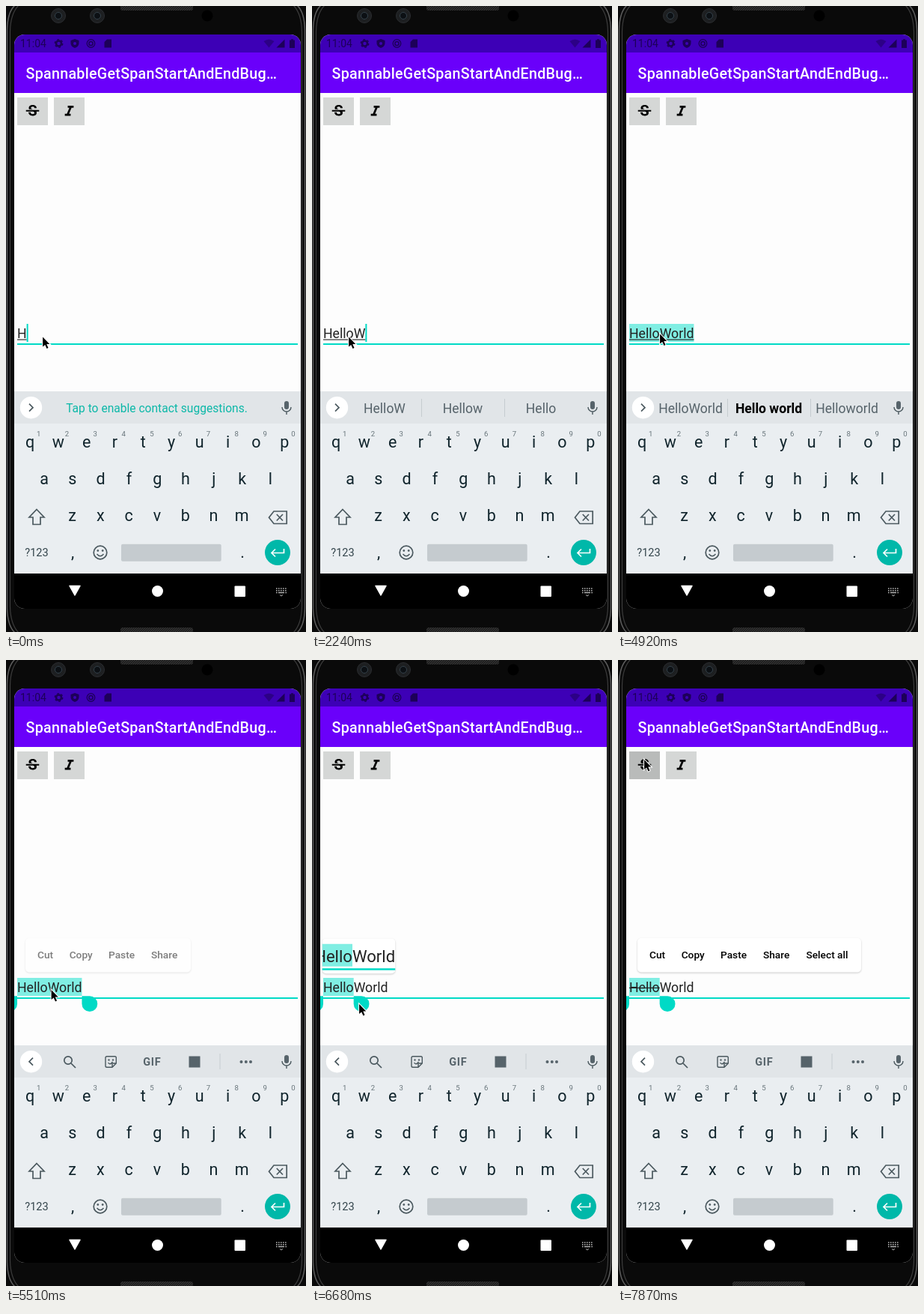
An HTML page that plays this animation: 401x835 px, repeating every 8000 ms.

```html
<!DOCTYPE html>
<html lang="en">
<head>
<meta charset="utf-8">
<title>Text selection demo</title>
<style>
  html, body { margin: 0; width: 100%; height: 100%; overflow: hidden; background: #0a0a0a; }
  svg { display: block; width: 100%; height: 100%; font-family: Roboto, sans-serif; }
  .mid { text-anchor: middle; }
  .line { fill: none; stroke: #4b595f; stroke-width: 1.7; }
  .thin { stroke-width: 1.4; }
  .grey { fill: #56636a; }
  .teal { fill: #00dac6; }
  .key { font-size: 21.5px; fill: #10242c; }
  .hint { font-size: 9.6px; fill: #67747a; }
  .word { font-size: 17.55px; fill: #56636a; }
  .menu { font-size: 13.7px; font-weight: 500; }
  .card { fill: #fff; filter: drop-shadow(0 1px 1.3px rgba(0, 0, 0, .2)); }
</style>
</head>
<body>
<svg viewBox="0 0 401 835">
  <defs>
    <clipPath id="screen"><rect x="11" y="38" width="383" height="766" rx="14"/></clipPath>
    <clipPath id="lens"><rect x="-48.75" y="371.5" width="97.5" height="46.8" rx="5"/></clipPath>
    <pattern id="mesh" width="3" height="3" patternUnits="userSpaceOnUse">
      <rect width="3" height="3" fill="#303030"/><path d="M0 3L3 0" stroke="#151515"/>
    </pattern>
    <path id="grip" d="M0 0H10.4A10.4 10.4 0 1 1 0 10.4Z"/>
    <g id="rim" fill="none">
      <path d="M12 -1Q2 8 1.5 32V803Q2 827 12 836" stroke="#5e5e5e" stroke-width="1.5"/>
      <path d="M17 -1Q6 10 5.5 34V801Q6 825 17 836" stroke="#3c3c3c" stroke-width="1.2"/>
    </g>
  </defs>

  <!-- phone body -->
  <rect width="401" height="835" fill="#0a0a0a"/>
  <use href="#rim"/>
  <use href="#rim" transform="translate(401 0) scale(-1 1)"/>
  <rect x="153" y="-4" width="97" height="10" rx="3" fill="url(#mesh)"/>
  <rect x="153" y="829" width="97" height="10" rx="3" fill="url(#mesh)"/>
  <g fill="#1d1f21" stroke="#2b2d30">
    <circle cx="70" cy="13" r="9.5"/><circle cx="122" cy="13" r="9.5"/>
  </g>
  <g fill="#0c1014" stroke="#34414a">
    <circle cx="70" cy="13" r="4.5"/><circle cx="122" cy="13" r="4.5"/>
  </g>
  <circle cx="269" cy="13" r="7.5" fill="#000"/>

  <g clip-path="url(#screen)">
    <rect x="11" y="38" width="383" height="766" fill="#fdfdfd"/>
    <rect x="11" y="38" width="383" height="24" fill="#3d00b6"/>
    <rect x="11" y="62" width="383" height="54" fill="#6a00fa"/>

    <!-- status bar -->
    <g fill="#1d0059">
      <text x="19" y="55" font-size="14">11:04</text>
      <g fill="none" stroke="#1d0059">
        <circle cx="70.5" cy="50" r="3.5" stroke-width="2.6"/>
        <circle cx="70.5" cy="50" r="5.2" stroke-width="1.5" stroke-dasharray="2.7"/>
        <circle cx="113.5" cy="50" r="5.3" stroke-width="1.3"/>
        <circle cx="113.5" cy="50" r="2.6" stroke-width="1.5"/>
      </g>
      <path d="M92 44L97.5 46V50Q97 54.5 92 56Q87 54.5 86.5 50V46Z"/>
      <circle cx="92" cy="50" r="2" fill="#3d00b6"/>
      <path d="M135 44.5H141V55.5H131.5V48Z"/>
      <path d="M344.5 47Q351.5 42 358.5 47L351.5 55.5Z" opacity=".5"/>
      <path d="M372.5 44.5V55.5H361.5Z"/>
      <path d="M379 45.5H381V44.3H384V45.5H386V56H379Z"/>
    </g>
    <text x="26.6" y="96.5" font-size="19.7" font-weight="500" letter-spacing=".26" fill="#fff">SpannableGetSpanStartAndEndBug…</text>

    <!-- format buttons -->
    <rect id="strikeKey" x="15" y="122" width="41" height="37"/>
    <rect x="64" y="122" width="41" height="37" fill="#d5d7d6"/>
    <path transform="translate(23.8 129) scale(.975)" d="M6.85 7.08C6.85 4.37 9.45 3 12.24 3c1.64 0 3 .49 3.9 1.28.77.65 1.46 1.73 1.46 3.24h-3.01c0-.31-.05-.59-.15-.85-.29-.86-1.2-1.28-2.25-1.28-1.86 0-2.34 1.02-2.34 1.7 0 .48.25.88.74 1.21.38.25.77.48 1.41.7H7.39c-.21-.34-.54-.89-.54-1.92zM21 12v-2H3v2h9.62c1.15.45 1.96.75 1.96 1.97 0 1-.81 1.67-2.28 1.67-1.54 0-2.93-.54-2.93-2.51H6.4c0 .55.08 1.13.24 1.58.81 2.29 3.29 3.3 5.67 3.3 2.27 0 5.3-.89 5.3-4.05 0-.3-.01-1.16-.48-1.94H21z"/>
    <path transform="translate(72.8 129) scale(.975)" d="M10 4v3h2.21l-3.42 8H6v3h8v-3h-2.21l3.42-8H18V4z"/>

    <!-- text field -->
    <g id="field">
      <rect id="sel" x="15" y="424" height="24" fill="#80eee3"/>
      <text id="typed" x="15" y="443" font-size="17.7" fill="#212121"/>
      <rect id="under" x="15" y="444.5" height="1.1" fill="#212121"/>
      <rect id="strike" x="15" y="436.8" height="1.2" fill="#212121"/>
      <rect class="teal" x="15" y="450" width="375" height="2"/>
    </g>
    <rect id="caret" class="teal" y="424" width="2" height="24"/>
    <g id="grips" class="teal">
      <use href="#grip" transform="translate(15 448.3) scale(-1 1)"/>
      <use href="#grip" id="endGrip"/>
    </g>

    <!-- magnifier and floating menu -->
    <g id="mag">
      <rect class="card" x="-48.75" y="371.5" width="97.5" height="46.8" rx="5"/>
      <g clip-path="url(#lens)"><use href="#field" id="view"/></g>
    </g>
    <g id="bar">
      <rect id="barBox" class="card" x="26" y="371" width="221" height="45.5" rx="5"/>
      <g class="menu">
        <text x="42" y="398">Cut</text><text x="84.7" y="398">Copy</text>
        <text x="137" y="398">Paste</text><text x="194" y="398">Share</text>
        <text id="all" x="251.5" y="398">Select all</text>
      </g>
    </g>

    <!-- keyboard -->
    <rect x="11" y="514" width="383" height="43" fill="#e1e5e8"/>
    <rect x="11" y="557" width="383" height="200" fill="#eaeef1"/>
    <circle cx="33.5" cy="535.7" r="14.7" fill="#fff"/>
    <path id="chevron" class="line" d="M-2.5 -5L2.5 0L-2.5 5"/>
    <text id="tap" class="mid" x="201.5" y="542" font-size="15.6" fill="#0cb8a8">Tap to enable contact suggestions.</text>
    <g id="words" class="mid word">
      <path d="M146.5 524V548M257.5 524V548" stroke="#c6ccd0"/>
      <text x="97" y="542.5"/><text x="201.5" y="542.5"/><text x="306" y="542.5"/>
    </g>
    <g id="tools">
      <circle class="line" cx="83" cy="534" r="5.2"/>
      <path class="line" d="M87 538L93 544"/>
      <path class="line thin" d="M135 528.7H145.5Q147.3 528.7 147.3 530.5V538L142 543.3H135Q133 543.3 133 541.5V530.5Q133 528.7 135 528.7ZM147.3 538H142V543.3"/>
      <path class="line thin" d="M136.5 537Q139 541 142.5 536"/>
      <circle class="grey" cx="137.5" cy="533.5" r="1.2"/><circle class="grey" cx="143" cy="533.5" r="1.2"/>
      <text class="mid grey" x="195.3" y="540.5" font-size="14.5" font-weight="700" letter-spacing=".6">GIF</text>
      <rect class="grey" x="244.5" y="528.5" width="15" height="15"/>
      <path d="M286 525V546" stroke="#c6ccd0"/>
      <g class="grey"><circle cx="314.5" cy="536" r="2"/><circle cx="320.8" cy="536" r="2"/><circle cx="327" cy="536" r="2"/></g>
    </g>
    <rect class="grey" x="372" y="527" width="6" height="11" rx="3"/>
    <path class="line thin" d="M369 535A6 6 0 0 0 381 535M375 541V545"/>

    <g id="keys"></g>
    <path class="line" d="M41 671.5L51 682H46V691.5H36V682H31Z"/>
    <path class="line" d="M358 674H375.2V690.5H358L351.5 682.2ZM361.8 678L370 686.5M370 678L361.8 686.5"/>
    <text class="mid" x="41" y="734" font-size="14.6" fill="#34454c">?123</text>
    <text class="mid key" x="89" y="736">,</text>
    <text class="mid key" x="316" y="736">.</text>
    <circle class="line" cx="126" cy="729" r="8.8"/>
    <circle class="grey" cx="122.8" cy="726.5" r="1.4"/><circle class="grey" cx="129.2" cy="726.5" r="1.4"/>
    <path class="line thin" d="M121.5 731Q126 736.5 130.5 731"/>
    <rect x="154" y="717.7" width="133.7" height="23" rx="2" fill="#c5cbcf"/>
    <circle cx="363" cy="729" r="17" fill="#00b8a9"/>
    <path class="line" d="M371.5 724V729.5H355.5M360 724.5L355 729.5L360 734.5" style="stroke:#fff"/>

    <!-- navigation bar -->
    <rect x="11" y="757" width="383" height="47" fill="#000"/>
    <g fill="#fff">
      <path d="M85 773.5H99L92 786Z" stroke="#fff" stroke-width="1.5" stroke-linejoin="round"/>
      <circle cx="202.5" cy="780.5" r="7.5"/>
      <rect x="305.5" y="773.5" width="14.5" height="14.5" rx="1"/>
    </g>
    <g fill="none" stroke="#b5b5b5" stroke-width="1.5">
      <path d="M361 777H375M361 779.7H375" stroke-dasharray="1.6 1.4"/>
      <path d="M361 782.4H375" stroke-dasharray="1.6 1.4 8 1.4"/>
      <path d="M366 785.5L368 787L370 785.5" stroke-width="1"/>
    </g>
  </g>

  <path id="mouse" d="M.6 1V14L3.7 11.4L6 16.5L8 15.6L5.8 10.5H9.8Z" stroke="#fff" stroke-width="2" paint-order="stroke"/>
</svg>
<script>
const $ = id => document.getElementById(id);
const set = (id, attrs) => { for (const k in attrs) $(id).setAttribute(k, attrs[k]); };
const show = (id, on) => set(id, { opacity: +on });

const key = (ch, x, y, cls = 'key') => `<text class="mid ${cls}" x="${x}" y="${y}">${ch}</text>`;
const row = (chars, x, y, cls) => [...chars].map((ch, i) => key(ch, x + i * 37.8, y, cls)).join('');
$('keys').innerHTML = row('qwertyuiop', 32, 588.5) + row('1234567890', 43.7, 574, 'hint') +
  row('asdfghjkl', 51, 637.5) + row('zxcvbnm', 88.5, 686.5);

const TEXT = 'HelloWorld', LOOP = 8000;
const pen = document.createElement('canvas').getContext('2d');
const width = n => {
  pen.font = '17.7px Roboto, sans-serif';
  return pen.measureText(TEXT.slice(0, n)).width;
};

// Each step changes part of the state at its time in ms.
const steps = [
  [0, { n: 1, caret: 1, under: 1, strip: 'tap', words: ['', '', ''], bold: 0, sel: 0, grips: 0,
        mag: 0, bar: 0, wide: 0, press: 0, strike: 0, x: 48.5, y: 440.5 }],
  [450, { caret: 0 }],
  [600, { n: 2, caret: 1 }],
  [1040, { n: 3 }],
  [1190, { strip: 'words', words: ['Hel', 'Hello', 'Held'] }],
  [1340, { n: 4, words: ['Hell', 'Hello', 'Hells'] }],
  [1490, { n: 5, words: ['Hello', 'Hello’s', 'Hellos'] }],
  [1940, { caret: 0 }],
  [2240, { n: 6, caret: 1, words: ['HelloW', 'Hellow', 'Hello'] }],
  [2540, { n: 7, words: ['HelloWo', 'Hello wo', 'Hellowo'] }],
  [2680, { n: 8, words: ['HelloWor', 'Hello wor', 'Helloworld'] }],
  [3130, { caret: 0 }],
  [3280, { n: 9, caret: 1, words: ['HelloWorl', 'Hello world', 'Helloworld'], bold: 1 }],
  [3430, { n: 10, words: ['HelloWorld', 'Hello world', 'Helloworld'] }],
  [3730, { x: 49.5, y: 440 }],
  [3880, { x: 51.5, y: 439, caret: 0 }],
  [4020, { x: 53.5, y: 438 }],
  [4170, { x: 55, y: 437 }],
  [4320, { x: 55.5, y: 436.5, caret: 1 }],
  [4920, { sel: 10, caret: 0 }],
  [5220, { grips: 1, under: 0, strip: 'tools' }],
  [5370, { bar: .5, x: 60, y: 439 }],
  [5520, { bar: 1, x: 72, y: 445 }],
  [5660, { x: 86, y: 451 }],
  [5810, { x: 97, y: 456 }],
  [5960, { x: 102, y: 457.5 }],
  [6100, { mag: 1 }],
  [6250, { bar: 0, x: 101 }],
  [6390, { x: 92, sel: 9 }],
  [6540, { x: 74, sel: 7 }],
  [6680, { x: 62.5, y: 458, sel: 5 }],
  [6980, { x: 62 }],
  [7130, { mag: 0, x: 61, y: 448 }],
  [7270, { x: 52, y: 300 }],
  [7420, { x: 36, y: 147, bar: .45, wide: 1 }],
  [7570, { x: 34.5, y: 132, bar: 1 }],
  [7720, { press: 1 }],
  [7870, { strike: 1 }],
];

function draw(t) {
  const s = Object.assign({}, ...steps.filter(([at]) => at <= t).map(([, change]) => change));
  const w = width(s.n), selW = s.sel ? width(s.sel) : 0;

  $('typed').textContent = TEXT.slice(0, s.n);
  set('under', { width: s.under * w });
  set('strike', { width: s.strike * selW });
  set('sel', { width: selW });
  set('caret', { x: 15 + w });
  show('caret', s.caret);
  set('endGrip', { transform: `translate(${15 + selW} 448.3)` });
  show('grips', s.grips);

  set('mag', { transform: `translate(${s.x} 0)` });
  set('view', { transform: `translate(0 395) scale(1.25) translate(${-s.x} -437)` });
  show('mag', s.mag);
  show('bar', s.bar);
  show('all', s.wide);
  set('barBox', { width: s.wide ? 299 : 221 });

  for (const id of ['tap', 'words', 'tools']) show(id, s.strip === id);
  document.querySelectorAll('#words text').forEach((el, i) => {
    const strong = s.bold && i === 1;
    el.textContent = s.words[i];
    el.style.fontWeight = strong ? 700 : 400;
    el.style.fill = strong ? '#000' : '';
  });
  set('chevron', { transform: `translate(33.5 535.7) scale(${s.strip === 'tools' ? -1 : 1} 1)` });
  set('strikeKey', { fill: s.press ? '#b9bbba' : '#d5d7d6' });
  set('mouse', { transform: `translate(${s.x} ${s.y})` });
}

let start;
function tick(now) {
  start ??= now;
  draw((now - start) % LOOP);
  requestAnimationFrame(tick);
}
draw(0);
requestAnimationFrame(tick);
</script>
</body>
</html>
```
